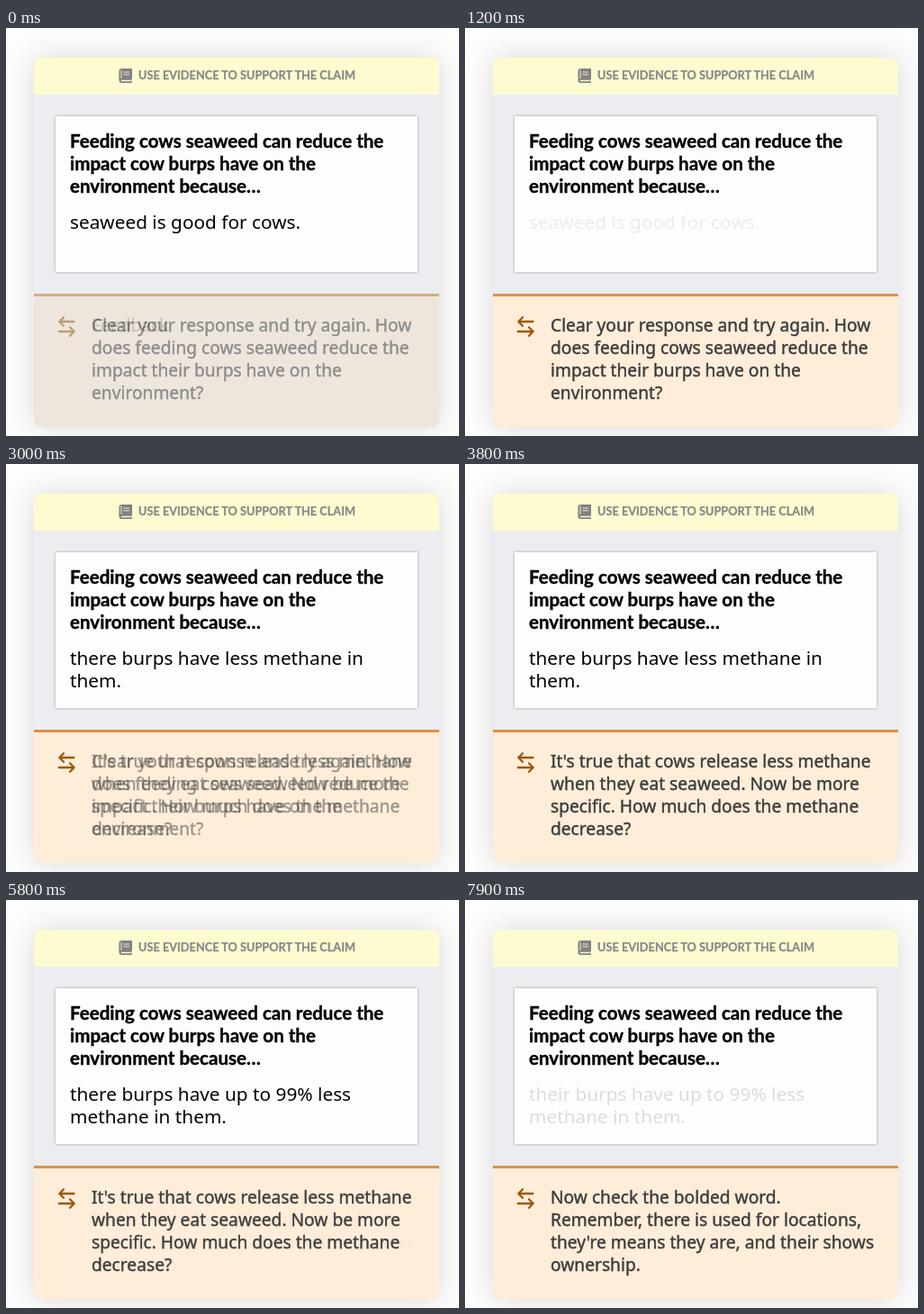
Write an HTML page that moves like this. It is 503 by 453 pixels and loops after 8 s.

```html
<!DOCTYPE html>
<html lang="en">
<head>
<meta charset="utf-8">
<title>Writing feedback</title>
<style>
  html, body { margin: 0; width: 100%; height: 100%; overflow: hidden; background: #fdfdfd; }
  svg { display: block; width: 503px; height: 453px; }
  text { font-family: "Noto Sans", "Open Sans", sans-serif; }
  .card { filter: drop-shadow(0 0 16px rgba(0, 0, 0, .14)); }
  .box { filter: drop-shadow(0 0 1.5px rgba(0, 0, 0, .35)); }
  .label, .prompt, .bold { font-family: Lato, "Open Sans", sans-serif; font-weight: 700; }
  .label { font-size: 12.76px; fill: #87888b; stroke: #87888b; stroke-width: .25px; }
  .prompt { font-size: 20.55px; fill: #000; stroke: #000; stroke-width: .35px; }
  .answer { font-size: 20.8px; fill: #000; }
  .bold { font-size: 22.2px; }
  .note { font-size: 19.2px; fill: #3b3b3b; stroke: #3b3b3b; stroke-width: .4px; }
  .idle { fill: #999; stroke: #999; }

  .fade { animation: 8s cubic-bezier(.42, 0, .58, 1) infinite; }
  .panel { animation-name: panel; }
  .a1 { animation-name: a1; }
  .a2 { animation-name: a2; }
  .a3 { animation-name: a3; }
  .a4 { animation-name: a4; }
  .a5 { animation-name: a5; }
  .n1 { animation-name: n1; }
  .n2 { animation-name: n2; }
  .n3 { animation-name: n3; }

  /* the loop opens halfway through this fade */
  @keyframes panel {
    0% { opacity: .5; animation-timing-function: cubic-bezier(.29, .5, .58, 1); }
    3.125%, 100% { opacity: 1; }
  }
  @keyframes a1 {
    0%, 9.875% { opacity: 1; }
    16.125%, 100% { opacity: 0; }
  }
  @keyframes a2 {
    0%, 22.5% { opacity: 0; }
    28.75%, 47.5% { opacity: 1; }
    53.75%, 100% { opacity: 0; }
  }
  @keyframes a3 {
    0%, 60% { opacity: 0; }
    66.25%, 71.875% { opacity: 1; }
    78.125%, 100% { opacity: 0; }
  }
  @keyframes a4 {
    0%, 71.875% { opacity: 0; }
    78.125%, 84.875% { opacity: 1; }
    91.125%, 100% { opacity: 0; }
  }
  /* the loop closes during this fade */
  @keyframes a5 {
    0% { opacity: 0; }
    97.25% { opacity: 0; animation-timing-function: cubic-bezier(.42, 0, .71, .5); }
    100% { opacity: .4; }
  }
  @keyframes n1 {
    0%, 34.375% { opacity: 1; }
    40.625%, 100% { opacity: 0; }
  }
  @keyframes n2 {
    0%, 34.375% { opacity: 0; }
    40.625%, 71.875% { opacity: 1; }
    78.125%, 100% { opacity: 0; }
  }
  @keyframes n3 {
    0%, 71.875% { opacity: 0; }
    78.125%, 100% { opacity: 1; }
  }
</style>
</head>
<body>
<svg viewBox="0 0 503 453">
  <defs>
    <clipPath id="round"><rect x="31" y="33" width="450" height="410" rx="8"/></clipPath>
  </defs>

  <rect class="card" x="31" y="33" width="450" height="410" rx="8" fill="#ecedf1"/>
  <g clip-path="url(#round)">
    <rect x="31" y="33" width="450" height="41" fill="#fdfbcf"/>
    <rect x="31" y="295" width="450" height="148" fill="#dfdfde"/>
    <rect x="31" y="295" width="450" height="3" fill="#cbcbc0"/>
  </g>

  <g fill="#808184">
    <path d="M128.500 45h11.500v11.500l-.7 1v2.300l.7 .4v.8h-11.500a3 3 0 0 1-3-3v-10a3 3 0 0 1 3-3z"/>
    <path d="M130.500 49h6.500M130.500 51.800h6.500M128 46.500v9.500" stroke="#fdfbcf" stroke-width=".9"/>
    <path d="M128.500 58.500h9.500" stroke="#fdfbcf" stroke-width="1.600" stroke-linecap="round"/>
  </g>
  <text class="label" x="147" y="57">USE EVIDENCE TO SUPPORT THE CLAIM</text>

  <rect class="box" x="55" y="98" width="402" height="173" fill="#fdfdfd"/>
  <text class="prompt">
    <tspan x="71" y="132.500">Feeding cows seaweed can reduce the</tspan>
    <tspan x="71" y="157.500">impact cow burps have on the</tspan>
    <tspan x="71" y="182.500">environment because…</tspan>
  </text>

  <text class="answer fade a1" x="71" y="222.500">seaweed is good for cows.</text>
  <text class="answer fade a2">
    <tspan x="71" y="222.500">there burps have less methane in</tspan>
    <tspan x="71" y="247.500">them.</tspan>
  </text>
  <text class="answer fade a3">
    <tspan x="71" y="222.500">there burps have up to 99% less</tspan>
    <tspan x="71" y="247.500">methane in them.</tspan>
  </text>
  <text class="answer fade a4">
    <tspan x="71" y="222.500" class="bold">there</tspan> burps have up to 99% less
    <tspan x="71" y="247.500">methane in them.</tspan>
  </text>
  <text class="answer fade a5">
    <tspan x="71" y="222.500">their burps have up to 99% less</tspan>
    <tspan x="71" y="247.500">methane in them.</tspan>
  </text>

  <text class="note idle" x="95" y="337">Feedback</text>
  <g class="fade panel">
    <g clip-path="url(#round)">
      <rect x="31" y="295" width="450" height="148" fill="#feedd9"/>
      <rect x="31" y="295" width="450" height="3" fill="#dc9242"/>
    </g>
    <path d="M75.500 326H59.500M64 321.300L59.300 326L64 330.700M58.800 337H75.500M71 332.300L75.700 337L71 341.700"
      fill="none" stroke="#9a5a0a" stroke-width="2.300" stroke-linecap="round" stroke-linejoin="round"/>
    <text class="note fade n1">
      <tspan x="95" y="337">Clear your response and try again. How</tspan>
      <tspan x="95" y="362">does feeding cows seaweed reduce the</tspan>
      <tspan x="95" y="387">impact their burps have on the</tspan>
      <tspan x="95" y="412">environment?</tspan>
    </text>
    <text class="note fade n2">
      <tspan x="95" y="337">It's true that cows release less methane</tspan>
      <tspan x="95" y="362">when they eat seaweed. Now be more</tspan>
      <tspan x="95" y="387">specific. How much does the methane</tspan>
      <tspan x="95" y="412">decrease?</tspan>
    </text>
    <text class="note fade n3">
      <tspan x="95" y="337">Now check the bolded word.</tspan>
      <tspan x="95" y="362">Remember, there is used for locations,</tspan>
      <tspan x="95" y="387">they're means they are, and their shows</tspan>
      <tspan x="95" y="412">ownership.</tspan>
    </text>
  </g>
</svg>
</body>
</html>
```
